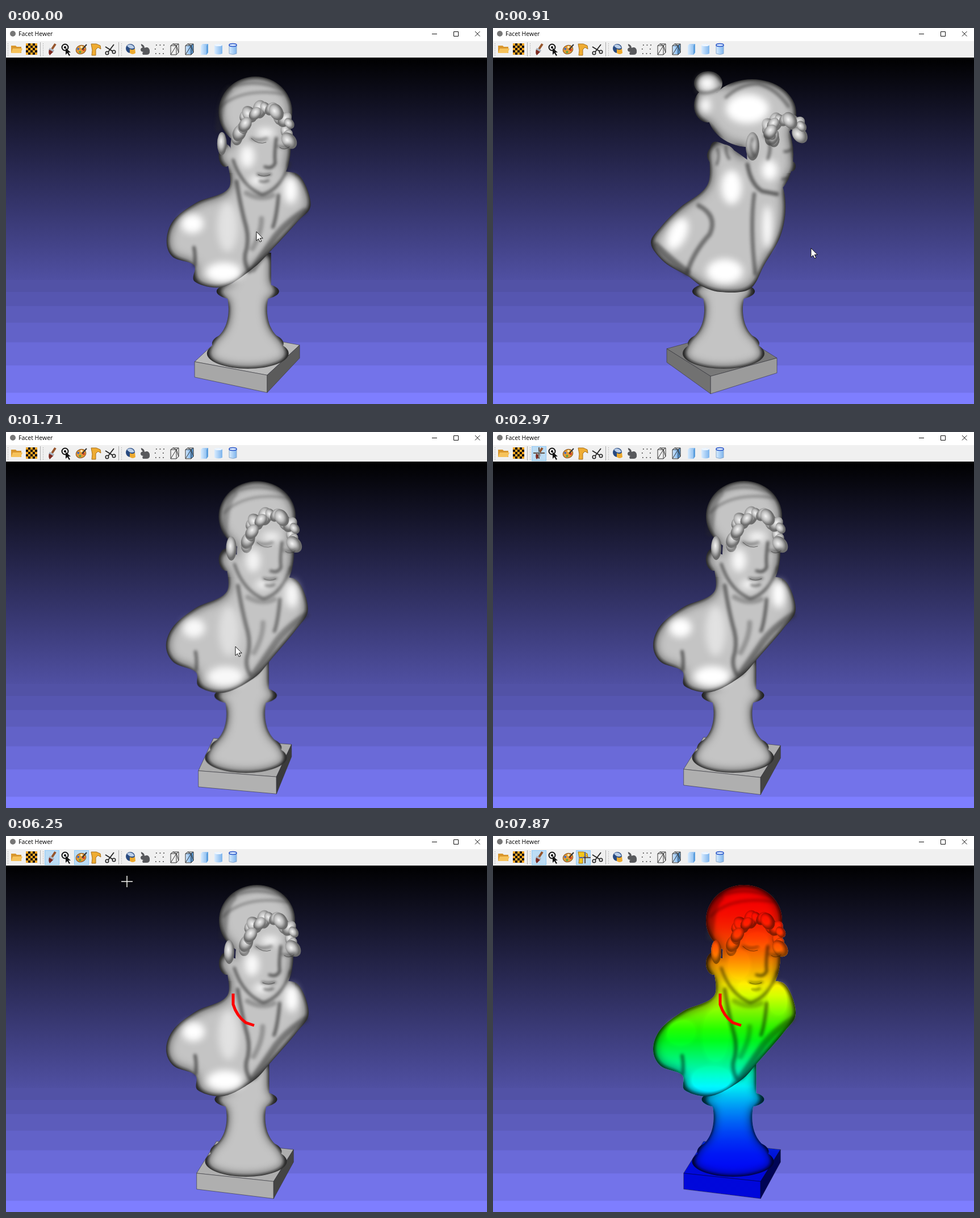
Animation, 847 px wide and 661 px high, one loop 8000 ms. Source, as an HTML page:

```html
<!DOCTYPE html>
<html lang="en">
<head>
<meta charset="utf-8">
<title>Facet Hewer</title>
<style>
  html, body { margin: 0; width: 100%; height: 100%; overflow: hidden; background: #fff; }
  svg { display: block; width: 847px; height: 661px; }
  #cross { mix-blend-mode: difference; }
  #solid { isolation: isolate; }
  #heat { mix-blend-mode: multiply; }
  .soft { fill: none; stroke: #2c2c2c; stroke-linecap: round; filter: url(#blur3); }
  .glow { fill: #fff; filter: url(#blur8); }
  .line { fill: none; stroke: #222; stroke-linecap: round; opacity: .6; }
</style>
</head>
<body>
<svg id="stage" viewBox="0 0 847 661" xmlns="http://www.w3.org/2000/svg">
  <defs id="defs">
    <linearGradient id="sky" gradientUnits="userSpaceOnUse" x1="0" y1="51" x2="0" y2="661">
      <stop stop-color="#000"/><stop offset="1" stop-color="rgb(124,124,252)"/>
    </linearGradient>
    <linearGradient id="rainbow" gradientUnits="userSpaceOnUse" x1="0" y1="80" x2="0" y2="640"/>
    <linearGradient id="blue"><stop stop-color="#d8ecff"/><stop offset="1" stop-color="#7db4ec"/></linearGradient>
    <radialGradient id="curl" cx=".42" cy=".4">
      <stop stop-color="#f4f4f4"/><stop offset=".55" stop-color="#bdbdbd"/><stop offset="1" stop-color="#6c6c6c"/>
    </radialGradient>
    <clipPath id="shape"/>
  </defs>

  <rect y="51" width="847" height="610" fill="url(#sky)"/>
  <g id="bands"></g>

  <g id="bust">
    <g id="solid">
      <g id="tone">
        <g id="plinth"></g>
        <g id="column" filter="url(#relief9)">
          <ellipse cy="572" rx="72" ry="27"/>
          <ellipse cy="555" rx="63" ry="24"/>
          <path d="M-38 466C-31 490-30 528-59 548Q0 576 59 548C30 528 31 490 38 466z"/>
          <ellipse cy="463" rx="55" ry="17"/>
          <rect x="-26" y="395" width="67" height="62"/>
        </g>
        <g id="rings">
          <g class="soft" opacity=".55" stroke-width="3">
            <path d="M-58 556Q0 596 58 556M-66 574Q0 610 66 574"/>
            <path d="M-50 468Q0 486 50 468M-36 483Q0 494 36 483" />
          </g>
          <ellipse class="glow" cy="517" rx="9" ry="28"/>
        </g>
        <g id="body" filter="url(#relief10)"></g>
        <g id="curls" fill="url(#curl)"></g>
        <g id="frontBody">
          <g class="soft">
            <path d="M408 270Q416 320 425 350Q431 375 423 398Q421 415 430 428" stroke-width="7" opacity=".6"/>
            <path d="M482 294Q478 335 472 350M333 386Q336 400 334 418" stroke-width="6" opacity=".65"/>
            <path d="M528 322Q494 342 475 368L437 424" stroke-width="11" opacity=".45"/>
            <path d="M452 335Q452 360 436 388M425 290Q450 304 472 294" stroke-width="9" opacity=".3"/>
            <path d="M402 232Q417 278 453 293Q487 283 501 238" stroke-width="5" opacity=".65"/>
          </g>
          <g class="glow">
            <ellipse cx="330" cy="344" rx="20" ry="17"/>
            <ellipse cx="386" cy="430" rx="32" ry="18"/>
            <ellipse cx="392" cy="350" rx="18" ry="44" opacity=".5"/>
            <ellipse cx="503" cy="285" rx="12" ry="24"/>
          </g>
        </g>
        <g id="frontHead">
          <g class="glow" opacity=".9">
            <ellipse cx="433" cy="226" rx="13" ry="20"/>
            <ellipse cx="465" cy="184" rx="16" ry="8"/>
            <ellipse cx="450" cy="268" rx="14" ry="8"/>
          </g>
          <g class="soft">
            <path d="M440 194Q452 200 467 194M488 208Q498 212 507 206" stroke-width="5" opacity=".45"/>
            <path d="M484 194Q480 222 482 238Q476 249 464 244" stroke-width="5" opacity=".75"/>
            <path d="M451 257Q461 260 474 257M455 269Q462 272 470 268" stroke-width="4" opacity=".65"/>
            <path d="M382 142Q420 104 496 116M400 104Q450 88 492 108" stroke-width="4" opacity=".4"/>
            <path d="M382 178Q386 120 400 108" stroke-width="12" opacity=".3"/>
          </g>
          <path class="line" d="M440 194Q452 206 466 201M490 210Q498 216 507 209M452 258Q462 263 473 258"/>
        </g>
        <g id="side">
          <g class="glow">
            <ellipse cx="448" cy="142" rx="38" ry="26"/>
            <ellipse cx="325" cy="362" rx="16" ry="30" transform="rotate(25 325 362)"/>
            <ellipse cx="420" cy="280" rx="18" ry="30"/>
            <ellipse cx="408" cy="428" rx="32" ry="22"/>
            <ellipse cx="487" cy="250" rx="14" ry="18"/>
            <ellipse cx="483" cy="350" rx="8" ry="38"/>
            <ellipse cx="377" cy="97" rx="14" ry="11"/>
            <ellipse cx="374" cy="136" rx="9" ry="13"/>
          </g>
          <g class="soft">
            <path d="M286 382Q316 410 342 430" stroke-width="12" opacity=".5"/>
            <path d="M362 312Q396 330 382 362Q352 395 342 430" stroke-width="8" opacity=".55"/>
            <path d="M460 292Q452 350 462 432" stroke-width="7" opacity=".55"/>
            <path d="M448 240Q454 275 474 287L500 292" stroke-width="7" opacity=".65"/>
            <path d="M410 122Q436 98 468 98Q500 108 520 138M357 111Q380 120 402 104" stroke-width="5" opacity=".5"/>
            <path d="M395 212Q400 225 394 240M410 208Q410 222 416 230" stroke-width="4" opacity=".6"/>
            <path d="M457 194Q450 212 460 224M478 190Q494 200 484 230" stroke-width="5" opacity=".6"/>
            <path d="M513 217Q520 218 526 213M510 266L520 264" stroke-width="4" opacity=".7"/>
          </g>
        </g>
      </g>
      <g clip-path="url(#shape)" id="heat"><rect x="250" y="60" width="330" height="600" fill="url(#rainbow)"/></g>
    </g>
    <path id="mark" d="M400 277V296Q406 316 422 328L437 333" fill="none" stroke="#f00" stroke-width="5"/>
  </g>

  <rect width="847" height="23" fill="#fff"/>
  <rect y="23" width="847" height="29" fill="#f0f0f0"/>
  <circle cx="12" cy="10" r="5" fill="#777"/>
  <text x="22" y="14" font-family="'Open Sans', 'Noto Sans', sans-serif" font-size="10.500" fill="#000">Facet Hewer</text>
  <path d="M750 10.500H759M788.500 6.500h8v8h-8zM826 6l8.500 8.500M834.500 6l-8.500 8.500" fill="none" stroke="#111"/>
  <g id="buttons" fill="#bcdcf4" stroke="#90c8f6"></g>
  <g id="icons">
    <path d="M60.500 25V50M198.500 25V50" stroke="#aaa"/>
    <path d="M3.500 27V49M65.500 27V49M203.500 27V49" stroke="#999" stroke-dasharray="1 2"/>
    <path d="M9 31h8l2 2h8v11H9z" fill="#d9972e"/><path d="M12 36h17l-3 8H9z" fill="#f6c25a"/>
    <rect x="35" y="27" width="20" height="20" fill="#111"/><g id="checks" fill="#f5a623"></g>
    <path d="M87 28l-6 9" stroke="#96552c" stroke-width="4"/><path d="M77 35l8 4-2 4-8-4z" fill="#aab4c0"/><path d="M76 38l7 4-6 6q-3-4-1-10z" fill="#7c2a20"/>
    <circle cx="104" cy="34" r="5.500" fill="none" stroke="#111" stroke-width="2"/><circle cx="104" cy="34" r="2"/><path d="M105 35v12l3-3 3 5 2-1-3-5h4z" fill="#111"/>
    <ellipse cx="132" cy="38" rx="9" ry="7.500" fill="#e39a35" stroke="#84501b" transform="rotate(-20 132 38)"/>
    <g id="paint"></g>
    <path d="M142 29l-8 9" stroke="#333" stroke-width="2"/>
    <path id="clay" d="M150 28h9l7 3 1 6-5-3-4 4v10h-7l1-9z" stroke="#a66f1a"/>
    <path d="M175 33l13 8M190 29l-10 13" stroke="#222" stroke-width="1.800"/><g fill="none" stroke="#222" stroke-width="1.600"><circle cx="178" cy="44" r="2.700"/><circle cx="190" cy="42" r="2.700"/></g>
    <circle cx="219" cy="36" r="8" fill="#284a80"/><path d="M213 31a8 8 0 0 1 13 4q-7 4-13-4z" fill="#b9cde8"/><path d="M218 37q6 3 9-1l1 8q-5 4-10 0z" fill="#edaa2f"/>
    <path d="M238 28q6 2 6 7 7-3 9 4 1 8-5 8h-7q-2-4 1-5-5 0-5-4 0-3 4-4-4-3-3-6z" fill="#58595c"/>
    <path d="M264 30h16M262 37h4M276 37h4M263 45h16" stroke="#222" stroke-width="1.600" stroke-dasharray="1.600 5"/>
    <rect x="316" y="30" width="9" height="16" fill="url(#blue)"/><path d="M325 30l5-2v16l-5 3z" fill="#5c9edc"/>
    <path id="wire" d="M290 31l4-3h10v15l-4 4h-10zM290 31h10v16M300 31l4-3M290 47l10-16 4 12M294 28l6 3" fill="none" stroke="#333"/>
    <use href="#wire" x="26"/>
    <path d="M343 31l3-3h10v15l-3 4h-10z" fill="url(#blue)"/><path d="M353 31l3-3v15l-3 4z" fill="#5c9edc"/>
    <path d="M367 30q7-4 14 0v15q-7 3-14 0z" fill="url(#blue)"/><ellipse cx="374" cy="30" rx="7" ry="2" fill="#eef6ff"/>
    <path d="M393 30v15q7 3 13 0V30" fill="url(#blue)" stroke="#8ba9cc"/><ellipse cx="399.500" cy="30" rx="6.500" ry="2.500" fill="#dcecff" stroke="#2a55c8" stroke-width="1.600"/>
  </g>

  <path id="arrow" d="M0 0V16L3.600 12.600 6.200 18 8.800 17 6.200 11.600H11.200z" fill="#fff" stroke="#000" stroke-width=".9"/>
  <path id="cross" d="M-10 0H10M0-10V10" stroke="#fff" stroke-width="1.500"/>
</svg>

<script>
const $ = id => document.getElementById(id);
const lerp = (a, b, k) => a + (b - a) * k;
const mix = (a, b, k) => a.map((v, i) => lerp(v, b[i], k));
const clamp = v => Math.max(0, Math.min(1, v));
const grey = v => `rgb(${v},${v},${v})`;

function set(el, attrs) {
  for (const name in attrs) el.setAttribute(name, attrs[name]);
  return el;
}
const add = (parent, tag, attrs = {}) =>
  set(parent.appendChild(document.createElementNS('http://www.w3.org/2000/svg', tag)), attrs);

// Filters share one region; relief darkens a shape towards its outline
function makeFilter(id) {
  return add($('defs'), 'filter', { id, filterUnits: 'userSpaceOnUse', x: 200, y: 50, width: 400, height: 611, 'color-interpolation-filters': 'sRGB' });
}
for (const size of [3, 8]) add(makeFilter('blur' + size), 'feGaussianBlur', { stdDeviation: size * .8 });
for (const size of [9, 10]) {
  const f = makeFilter('relief' + size);
  set(f, { x: -200, width: 900 });
  add(f, 'feGaussianBlur', { in: 'SourceAlpha', stdDeviation: size });
  add(f, 'feColorMatrix', { values: '0 0 0 1 0 0 0 0 1 0 0 0 0 1 0 0 0 0 0 1' });
  const map = add(f, 'feComponentTransfer');
  for (const ch of 'RGB') add(map, 'feFunc' + ch, { type: 'table', tableValues: '0 .08 .22 .6 .77' });
  add(f, 'feComposite', { operator: 'in', in2: 'SourceAlpha' });
}
for (const id of ['column', 'rings']) $(id).style.transformBox = 'view-box';
add(makeFilter('vivid'), 'feColorMatrix', { values: '1.25 0 0 0 0 0 1.25 0 0 0 0 0 1.25 0 0 0 0 0 1 0' });

// Backdrop bands widen towards the bottom
for (let y = 443, h = 21; y < 661; y += h, h *= 1.18) {
  const f = (y + h / 2 - 51) / 610;
  add($('bands'), 'rect', { y, width: 847, height: h + 1, fill: `rgb(${124 * f},${124 * f},${252 * f})` });
}
// Heat runs from red at the crown to blue at the foot
for (let y = 80; y <= 640; y += 20) {
  const u = clamp((y - 105) / 490);
  add($('rainbow'), 'stop', { offset: (y - 80) / 560, 'stop-color': `hsl(${238 * u * u * (3 - 2 * u)},100%,50%)` });
}
for (let i = 0; i < 25; i += 2)
  add($('checks'), 'rect', { x: 35 + i % 5 * 4, y: 27 + Math.floor(i / 5) * 4, width: 4, height: 4 });
['#56a04a', '#4169c0', '#f4e9c0', '#cf3c28'].forEach((fill, i) =>
  add($('paint'), 'circle', { cx: 132 + 5 * Math.cos(i * 1.5 + 1.9), cy: 38 + 4.5 * Math.sin(i * 1.5 + 1.9), r: 2, fill }));
const buttonLefts = [68, 120, 146];
const buttons = buttonLefts.map(x => add($('buttons'), 'rect', { x: x + .5, y: 25.5, width: 25, height: 25 }));

// Torso outline key points, clockwise in pairs: front view, side view
const points = text => text.split(' ').map(p => p.split(',').map(Number));
const torso = {
  front: points('394,215 390,280 335,308 295,340 282,375 295,404 333,420 338,447 384,457 436,430 468,396 512,345 533,312 516,263 480,250'),
  side: points('390,200 378,275 330,315 297,348 278,378 302,412 343,436 366,453 400,464 452,459 478,416 506,366 515,318 508,275 480,255'),
  el: add($('body'), 'path')
};
// Rounded masses: [cx, cy, rx, ry] in front view and side view
const masses = [
  { front: [442, 148, 67, 62], side: [456, 150, 78, 60] },   // skull
  { front: [455, 212, 51, 77], side: [488, 222, 41, 70] },   // face
  { front: [472, 238, 6, 8], side: [526, 243, 7, 9] },       // nose
  { front: [420, 120, 22, 20], side: [379, 97, 25, 21] },    // bun
  { front: [420, 140, 22, 28], side: [378, 136, 24, 30] },
  { front: [389, 224, 14, 20], side: [402, 224, 25, 20] },   // nape
  { front: [393, 204, 9, 21], side: [457, 208, 12, 25], fill: 'url(#curl)' } // ear
].map(m => ({ ...m, el: add($(m.fill ? 'curls' : 'body'), 'ellipse') }));

// Fringe: curls along an elliptic arc [cx, cy, rx, ry, from, to]
const fringe = { front: [464, 194, 48, 48, 175, 365], side: [514, 182, 32, 20, 130, 380] };
const curls = Array.from({ length: 17 }, (_, i) => ({ u: i * 7 % 17 / 16, el: add($('curls'), 'ellipse') }));

const plinth = [0, 1, 2].map(() => add($('plinth'), 'polygon', { stroke: '#333', 'stroke-width': .6 }));

[...plinth, ...$('column').children, ...$('body').children, ...$('curls').children].forEach((el, i) => {
  el.id = 'part' + i;
  add($('shape'), 'use', { href: '#' + el.id });
});

// Closed smooth curve through the points
function smooth(p) {
  const n = p.length, at = i => p[(i + n) % n];
  const handle = (from, a, b, s) => from.map((v, j) => v + s * (b[j] - a[j]) / 6);
  return 'M' + p[0] + p.map((b, i) =>
    'C' + handle(b, at(i - 1), at(i + 1), 1) + ' ' + handle(at(i + 1), b, at(i + 2), -1) + ' ' + at(i + 1)).join('') + 'z';
}

function drawPlinth(k, tilt) {
  const cx = lerp(421, 403, k) + 4 * tilt, turn = 59.5 - 48 * k - 7 * tilt;
  const corners = [180, 90, 0, -90].map(offset => {
    const a = (turn + offset) * Math.PI / 180;
    return { a, x: cx + 99 * Math.cos(a), y: 572 + 41 * Math.sin(a), h: 25 + 6 * Math.sin(a) };
  });
  // The corner nearest the viewer separates the two visible faces
  const near = corners.reduce((best, c, i) => c.y > corners[best].y ? i : best, 0);
  set(plinth[0], { points: corners.map(c => [c.x, c.y]).join(' '), fill: grey(lerp(175, 120, k)) });
  [-1, 0].forEach((side, n) => {
    const p = corners[(near + side + 4) % 4], q = corners[(near + side + 5) % 4];
    const facing = Math.sin(corners[near].a + (n ? -1 : 1) * Math.PI / 4);
    set(plinth[n + 1], {
      points: [[p.x, p.y], [q.x, q.y], [q.x, q.y + q.h], [p.x, p.y + p.h]].join(' '),
      fill: grey(30 + 150 * Math.max(0, facing))
    });
  });
}

function drawBust(k, tilt) {
  drawPlinth(k, tilt);
  const shift = `translate(${lerp(422.5, 406, k) + 4 * tilt})`;
  for (const el of [...$('column').children, $('rings')]) set(el, { transform: shift });
  set(torso.el, { d: smooth(torso.front.map((p, i) => mix(p, torso.side[i], k))) });
  for (const { front, side, fill, el } of masses) {
    const [cx, cy, rx, ry] = mix(front, side, k);
    set(el, { cx, cy, rx, ry, fill: fill || '#000' });
  }
  const [cx, cy, rx, ry, from, to] = mix(fringe.front, fringe.side, k);
  curls.forEach(({ u, el }, i) => {
    const a = lerp(from, to, u) * Math.PI / 180, r = .93 + .12 * Math.sin(i * 2.4), size = 11.5 + 2.5 * Math.sin(i * 1.7);
    set(el, {
      cx: cx + rx * r * Math.cos(a), cy: cy + ry * r * Math.sin(a), rx: size * .85, ry: size * 1.15,
      transform: `rotate(${40 * Math.sin(i * 3)} ${cx + rx * r * Math.cos(a)} ${cy + ry * r * Math.sin(a)})`
    });
  });
  set($('frontBody'), { opacity: clamp(1 - 1.8 * k), transform: `translate(${10 * k})` });
  set($('frontHead'), { opacity: clamp(1 - 1.8 * k), transform: `translate(${40 * k})` });
  set($('side'), { opacity: clamp(1.8 * k - .8) });
  set($('bust'), { transform: `rotate(${-2.6 * tilt} 540 350)` });
}

// Progress that advances in equal visible steps
function stepped(t, start, end, steps) {
  if (t < start) return 0;
  return Math.min(1, (Math.floor((t - start) * (steps - 1) / (end - start) + .03) + 1) / steps);
}

function pose(t) {
  const out = stepped(t, 590, 1300, 10), back = (1 - stepped(t, 1400, 1860, 7)) ** 2.2;
  return [lerp(-.2, 1, clamp(2 * out)) * back, clamp(2 * out - 1) ** 2 * back];
}

// Pointer moves: start, end, steps, destination
const moves = [
  [130, 440, 5, 381, 382], [590, 910, 5, 560, 387], [990, 1070, 2, 598, 368], [1150, 1300, 3, 504, 372],
  [1400, 1710, 5, 404, 377], [1780, 1860, 2, 396, 377], [2180, 2800, 9, 81, 37], [3270, 3520, 4, 509, 314],
  [3670, 3980, 5, 400, 277], [4470, 4470, 2, 436, 333], [4690, 4840, 3, 430, 131], [5010, 5700, 10, 132, 37],
  [6170, 6250, 2, 213, 80], [7100, 7560, 7, 162, 38]
];

function pointer(t, drawn) {
  if (drawn > 0 && drawn < 1) {
    const p = $('mark').getPointAtLength(drawn * markLength);
    return [p.x, p.y];
  }
  let at = [441, 358];
  for (const [start, end, steps, ...to] of moves)
    if (t >= start) at = mix(at, to, end > start ? stepped(t, start, end, steps) : 1);
  return at;
}

const show = (el, on) => set(el, { visibility: on ? 'visible' : 'hidden' });
const markLength = $('mark').getTotalLength();
let lastPose = '';

function render(t) {
  const [k, tilt] = pose(t), key = k + ' ' + tilt;
  if (key !== lastPose) drawBust(k, tilt);
  lastPose = key;

  const drawn = stepped(t, 4060, 4470, 6);
  show($('mark'), drawn > 0);
  set($('mark'), { 'stroke-dasharray': `${drawn * markLength} 200` });

  const [x, y] = pointer(t, drawn), crosshair = t >= 2970;
  for (const id of ['arrow', 'cross']) set($(id), { transform: `translate(${x} ${y})` });
  show($('arrow'), !crosshair);
  show($('cross'), crosshair);

  const heated = t >= 6320;
  set($('heat'), { display: heated ? 'inline' : 'none' });
  set($('tone'), { filter: heated ? 'url(#vivid)' : 'none' });
  set($('clay'), { fill: heated ? '#f2c61c' : '#efac32' });

  const pressed = [t >= 2970, t >= 6000 && !heated, t >= 7790];
  buttons.forEach((button, i) => {
    const left = buttonLefts[i], hover = y < 51 && x >= left && x < left + 26;
    show(button, pressed[i] || hover);
    set(button, { opacity: pressed[i] ? 1 : .6 });
  });
}

const begin = performance.now();
function tick() {
  render((performance.now() - begin) % 8000);
  requestAnimationFrame(tick);
}
tick();
</script>
</body>
</html>
```
